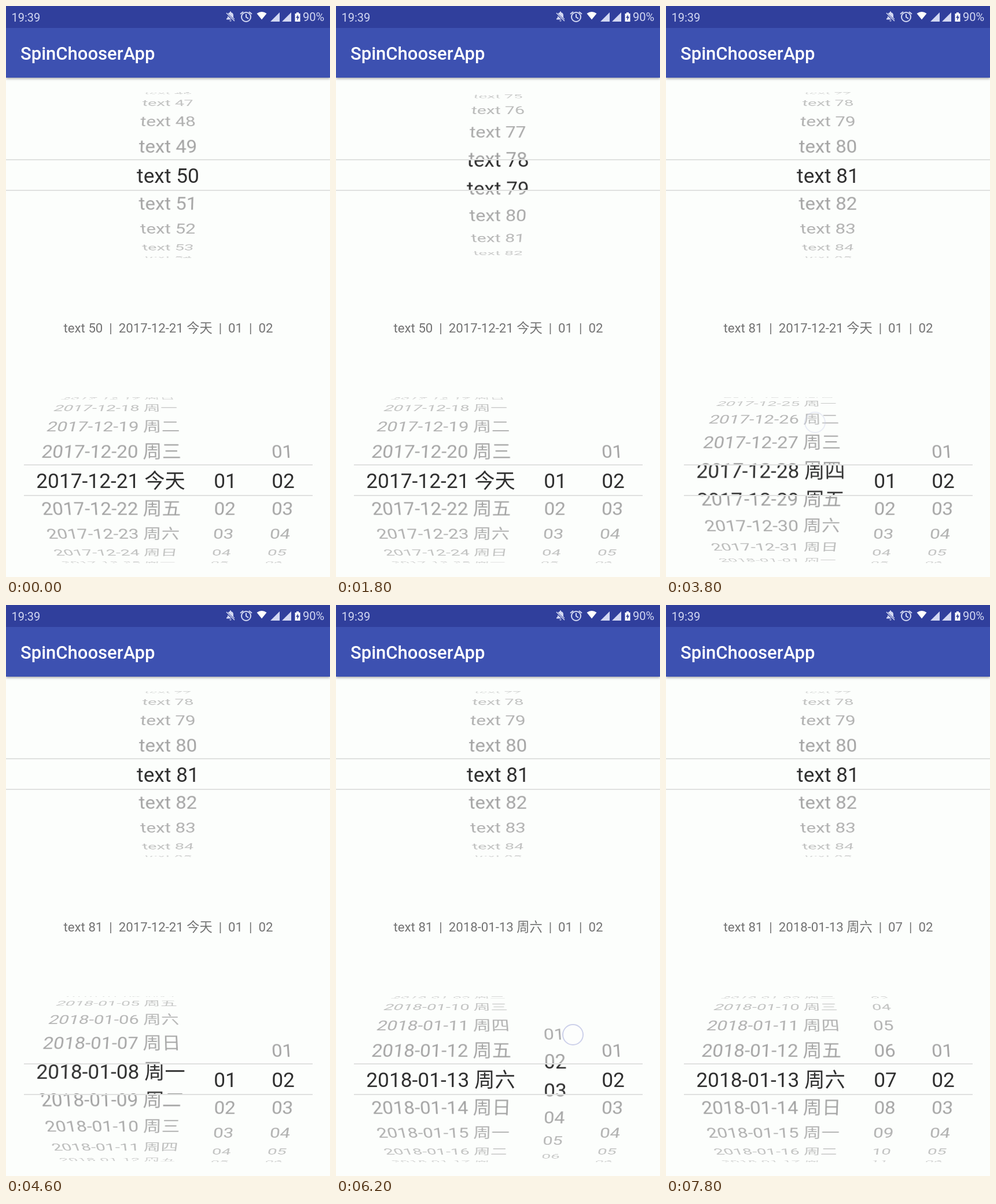
An HTML page for the animation above (8 s loop, 560 by 988 pixels).

```html
<!DOCTYPE html>
<html lang="zh-CN">
<head>
<meta charset="utf-8">
<title>Wheel picker</title>
<style>
  html, body { margin: 0; width: 100%; height: 100%; overflow: hidden; background: #fcfefc; }
  body { font-family: Roboto, "Noto Sans CJK SC", "Noto Sans CJK", sans-serif; }
  #stage { position: relative; width: 560px; height: 988px; overflow: hidden; background: #fcfefc; }
  #stage > * { position: absolute; }
  .bar { left: 0; top: 38px; width: 560px; height: 86px; background: #3d51b1; box-shadow: 0 2px 4px rgba(0, 0, 0, .32); }
  .title { left: 25px; top: 62px; font-size: 31px; line-height: 42px; font-weight: 500; color: #fff; }
  .status { left: 0; top: 0; }
  .summary { left: 0; top: 542px; width: 561px; font-size: 22.2px; line-height: 30px; text-align: center; white-space: pre; color: #727272; }
  .wheel, .band { overflow: hidden; }
  .wheel { height: 287px; }
  .grey, .band { position: absolute; left: 0; width: 100%; }
  .grey { top: 0; height: 100%; font-size: 33.6px; line-height: 52.6px; color: #a0a0a0; }
  .band { top: 117.5px; height: 52px; font-size: 35.3px; line-height: 54.4px; color: #303030; background: #fcfefc; }
  .row { position: absolute; left: 0; top: 50%; width: 100%; height: 52px; margin-top: -26px;
         text-align: center; white-space: nowrap; }
  .line { height: 2px; background: #e0e1e0; }
  .touch { width: 33px; height: 33px; margin: -18px; border: 2px solid #cdd1ea; border-radius: 50%;
           background: rgba(255, 255, 255, .35); }
</style>
</head>
<body>
<div id="stage">
  <div class="bar"></div>
  <div class="title">SpinChooserApp</div>
  <svg class="status" width="560" height="38" font-family="Roboto, sans-serif" font-size="20" fill="#d3d8f2">
    <rect width="560" height="38" fill="#303f9c"/>
    <text x="9.5" y="27">19:39</text>
    <text x="513" y="26">90%</text>
    <path d="M381 23.500V22l2-2v-4q0-4 4-5v-1.500h2v1.500q4 1 4 5v4l2 2v1.500zM386 25h4q-2 3-4 0z"/>
    <path d="M380 12l15 14" stroke="#303f9c" stroke-width="3.500"/>
    <g fill="none" stroke="#d3d8f2" stroke-width="2">
      <path d="M381 12l14 14" stroke-width="1.500"/>
      <circle cx="415" cy="19" r="8"/>
      <path d="M415 14v5l4 3M405 14l5-4M425 14l-5-4"/>
    </g>
    <path d="M433.500 13q8.500-6 17 0L442 23.500z" fill="#fff"/>
    <path d="M457 27h16V11zM477 27h16V11z"/>
    <path d="M499.500 13h2.500v-2h4v2h2.500v14h-9z" fill="#fff"/>
    <path d="M505 14.500l-4 6h2.500l-.5 5 4-7h-2.500z" fill="#303f9c"/>
  </svg>
  <div class="summary"></div>
</div>
<script>
const LOOP = 8000, TICK = 200;
const RADIUS = 144, STEP = 20.1 * Math.PI / 180, DEPTH = 475;
const stage = document.getElementById('stage');
const summary = stage.querySelector('.summary');

const pad = n => String(n).padStart(2, '0');
const number = i => i < 0 ? '' : pad(i + 1);
const textLabel = i => `text ${i}`;
function dateLabel(i) {
  const day = new Date(Date.UTC(2017, 11, 21 + i));
  const name = i ? '周' + '日一二三四五六'[day.getUTCDay()] : '今天';
  return `${day.toISOString().slice(0, 10)} ${name}`;
}

function add(className, style) {
  const el = document.createElement('div');
  el.className = className;
  Object.assign(el.style, style);
  stage.append(el);
  return el;
}

// Linear interpolation through [time, value] points.
function along(points, t) {
  const next = points.findIndex(p => p[0] > t);
  if (next === 0) return points[0][1];
  if (next < 0) return points[points.length - 1][1];
  const [t0, a] = points[next - 1], [t1, b] = points[next];
  return a + (b - a) * (t - t0) / (t1 - t0);
}

// Decelerating date fling, at rest on the 23rd day.
const dateAt = t => Math.max(0, 23 - 4.72 * Math.pow(Math.max(0, 5600 - t) / 1000, 2.04));
const textPath = [[400, 50], [600, 51.5], [800, 55], [1000, 61.5], [1200, 68], [1400, 73], [1600, 76.4],
  [1800, 78.55], [2000, 79.6], [2200, 80.2], [2400, 80.52], [2600, 80.72], [2800, 80.9], [3000, 81]];
const hourPath = [[5900, 0], [6000, .1], [6200, 1.63], [6400, 3.4], [6600, 4.5], [6800, 5.2],
  [7000, 5.65], [7200, 5.87], [7400, 6]];

// vanish: x towards which distant rows converge
const wheels = [
  { left: 0, top: 149, width: 560, vanish: 280, label: textLabel, at: t => along(textPath, t) },
  { left: 31, top: 677, width: 300, vanish: 248, label: dateLabel, at: dateAt },
  { left: 329, top: 677, width: 100, vanish: 329, label: number, at: t => along(hourPath, t) },
  { left: 428.5, top: 677, width: 100, vanish: 398, label: number, at: () => 1 }
];
for (const w of wheels) {
  const el = add('wheel', { left: w.left + 'px', top: w.top + 'px', width: w.width + 'px' });
  el.innerHTML = '<div class="grey"></div><div class="band"></div>';
  [w.grey, w.band] = el.children;
}
for (const y of [265, 317.5]) add('line', { left: 0, top: y + 'px', width: '560px' });
for (const y of [793, 845.5]) add('line', { left: '31px', top: y + 'px', width: '499px' });
const touch = add('touch', {});

function drawWheel(w, t) {
  const pos = w.at(t);
  if (pos === w.shown) return;
  w.shown = pos;
  let grey = '', band = '';
  for (let i = Math.ceil(pos - 5); i <= pos + 5; i++) {
    const angle = (i - pos) * STEP, cos = Math.cos(angle);
    if (cos < .02) continue;
    const transform = `translateY(${RADIUS * Math.sin(angle)}px) perspective(${DEPTH}px) ` +
      `translateZ(${-RADIUS * (1 - cos)}px) rotateX(${-angle}rad)`;
    const row = opacity => `<div class="row" style="transform-origin:${w.vanish - w.left}px 50%;` +
      `transform:${transform};opacity:${opacity}">${w.label(i)}</div>`;
    grey += row(.3 + .7 * cos);
    if (Math.abs(i - pos) < 1.4) band += row(1);
  }
  w.grey.innerHTML = grey;
  w.band.innerHTML = band;
}

const touches = [
  { time: 3600, x: 257, y: 790, opacity: 1 },
  { time: 3800, x: 257, y: 720, opacity: .4 },
  { time: 6000, x: 387, y: 822, opacity: 1 },
  { time: 6200, x: 409, y: 743, opacity: 1 }
];

function draw(t) {
  for (const w of wheels) drawWheel(w, t);
  summary.textContent = [
    textLabel(t < 3000 ? 50 : 81), dateLabel(t < 5600 ? 0 : 23), t < 7400 ? '01' : '07', '02'
  ].join('  |  ');
  const spot = touches.find(s => s.time === t);
  touch.style.opacity = spot ? spot.opacity : 0;
  if (spot) Object.assign(touch.style, { left: spot.x + 'px', top: spot.y + 'px' });
}

const start = performance.now();
let last = -1;
function frame() {
  const t = Math.floor((performance.now() - start) % LOOP / TICK) * TICK;
  if (t !== last) draw(last = t);
  requestAnimationFrame(frame);
}
frame();
</script>
</body>
</html>
```
